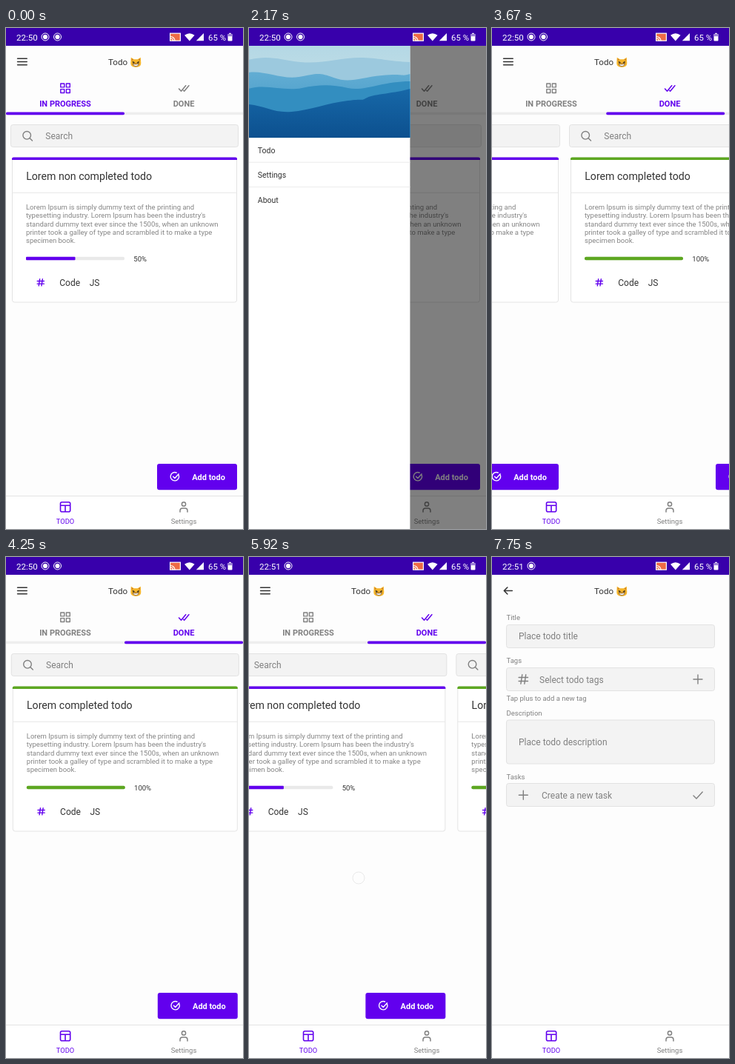
An HTML page that plays this animation: 320 px wide and 676 px high, repeating every 8 s.

```html
<!DOCTYPE html>
<html lang="en">
<head>
<meta charset="utf-8">
<title>Todo app</title>
<style>
html, body { margin: 0; width: 100%; height: 100%; overflow: hidden; background: #fdfdfd; }
svg { display: block; width: 100vw; height: 100vh; font-family: Roboto, sans-serif; }
.line { fill: none; stroke-linecap: round; stroke-linejoin: round; }
</style>
</head>
<body>
<svg id="stage" viewBox="0 0 320 676"></svg>
<script>
const LOOP = 8000;
const PURPLE = '#6200ee', GREEN = '#5da721', GREY = '#808080', INK = '#333';
const stage = document.getElementById('stage');

const text = (x, y, size, fill, str, extra = '') =>
  `<text x="${x}" y="${y}" font-size="${size}" fill="${fill}" ${extra}>${str}</text>`;
const rect = (x, y, w, h, fill, extra = '') =>
  `<rect x="${x}" y="${y}" width="${w}" height="${h}" fill="${fill}" ${extra}/>`;
const line = (d, color = GREY, width = 1.4) =>
  `<path class="line" d="${d}" stroke="${color}" stroke-width="${width}"/>`;
const field = (x, y, w, h) => rect(x + .5, y + .5, w - 1, h - 1, '#f3f3f3', 'rx="3" stroke="#e2e2e2"');
const group = (id, body) => `<g id="${id}">${body}</g>`;

const hash = (x, y, s, color) =>
  line(`M${x - s} ${y - s * .4}h${s * 2}M${x - s} ${y + s * .4}h${s * 2}M${x - s * .25} ${y - s}l${-s * .3} ${s * 2}M${x + s * .55} ${y - s}l${-s * .3} ${s * 2}`, color);
const plus = (x, y) => line(`M${x - 6} ${y}h12M${x} ${y - 6}v12`);

const cat = `<g transform="translate(175.3 46.5)">
  <path d="M-6.5-6.8L-2.5-4.3H2.5L6.5-6.8L7 1Q7 6.2 0 6.4Q-7 6.2-7 1Z" fill="#f5b52a"/>
  <path d="M-5.8-5.2l.4 3 2-1.6zM5.8-5.2l-.4 3-2-1.6z" fill="#c97a2b"/>
  <path d="M-4.7-1.7L-1.4-.3L-1.8 1H-4zM4.7-1.7L1.4-.3L1.8 1H4z" fill="#3d3020"/>
  <path d="M-4.2 2Q0 3.2 4.2 1.6Q3.5 5.2 0 5.2Q-3.5 5-4.2 2Z" fill="#fff" stroke="#6b4318" stroke-width=".7"/>
  <path d="M-1 .9H1L0 2z" fill="#7a4224"/></g>`;
const title = text(138, 50.3, 11.6, INK, 'Todo') + cat;

const record = x => `<circle cx="${x}" cy="12" r="5" fill="none" stroke="#fff"/><circle cx="${x}" cy="12" r="3.1" fill="#fff"/>`;
const statusBar = rect(0, 0, 320, 24, '#3800ab')
  + text(14, 16.5, 11.6, '#fff', '', 'id="clock"') + record(53) + group('second', record(69.5))
  + rect(221.6, 7.2, 13.8, 10, '#ee6b45', 'stroke="#fff" stroke-width="1.2"')
  + line('M222 11.5a6 6 0 0 1 6 6M222 14a3.5 3.5 0 0 1 3.5 3.5', '#fff', 1.1)
  + '<path d="M241 9.8Q247.8 4.8 254.6 9.8L247.8 17.6ZM267 7V17.2H256.8Z" fill="#fff"/>'
  + text(273, 16.5, 11.4, '#fff', '65 %')
  + rect(299.5, 8, 6, 9.5, '#fff', 'rx=".8"') + rect(301.2, 6.8, 2.6, 2, '#fff')
  + rect(299.5, 8, 6, 3.2, '#9b80d5');

const tabs = group('tab0',
    ['73.8 75', '81.4 75', '73.8 82.6', '81.4 82.6'].map(p => `<path class="line" d="M${p}h4.9v4.9h-4.9z" stroke="currentColor" stroke-width="1.4"/>`).join('')
    + text(80, 106, 11, 'currentColor', 'IN PROGRESS', 'font-weight="700" text-anchor="middle"'))
  + group('tab1', line('M233.5 82l3 3.3 6.2-7.6M239.5 84.2l1.2 1.1 6.2-7.6', 'currentColor', 1.5)
    + text(240, 106, 11, 'currentColor', 'DONE', 'font-weight="700" text-anchor="middle"'))
  + rect(0, 113.6, 320, 3.6, '#eeeeee') + rect(0, 113.6, 160, 3.6, PURPLE, 'id="bar" rx="1.6"');

const lorem = ['Lorem Ipsum is simply dummy text of the printing and',
  "typesetting industry. Lorem Ipsum has been the industry's",
  'standard dummy text ever since the 1500s, when an unknown',
  'printer took a galley of type and scrambled it to make a type', 'specimen book.'];

const page = (x, name, color, percent) => `<g transform="translate(${x})">`
  + field(6, 130, 308, 31)
  + '<circle cx="28.2" cy="144.8" r="5.3" fill="none" stroke="#808080" stroke-width="1.4"/>' + line('M32.2 148.8l3.3 3.3')
  + text(53.3, 150.3, 12, GREY, 'Search')
  + rect(8.5, 175, 303, 195, '#fff', 'rx="3" stroke="#e4e4e4"')
  + `<path d="M8 178V176.5Q8 174.5 10 174.5H310Q312 174.5 312 176.5V178Z" fill="${color}"/>`
  + text(27.2, 205.3, 14.15, INK, name) + rect(8.5, 221.7, 303, 1, '#e6e6e6')
  + lorem.map((s, i) => text(27, 245.2 + i * 11.25, 9.5, '#858585', s)).join('')
  + rect(27, 308.7, 133, 4.6, '#e9e9e9', 'rx="2"')
  + rect(27, 308.7, 133 * percent / 100, 4.6, color, percent < 100 ? 'rx="1"' : 'rx="2"')
  + text(172.3, 314.5, 9.5, INK, percent + '%')
  + hash(46.8, 343.3, 4.6, PURPLE) + text(72.3, 348, 12, INK, 'Code') + text(112.7, 348, 12, INK, 'JS')
  + rect(204, 588, 108, 35.3, PURPLE, 'rx="3"')
  + line('M233.2 603.2a5.7 5.7 0 1 1-3-3.2M225.6 605.2l2.3 2.3 5.2-5.8', '#fff', 1.4)
  + text(251.2, 609.8, 11, '#fff', 'Add todo', 'font-weight="700"') + '</g>';

const label = (y, str) => text(19.5, y, 9.5, GREY, str);
const hint = (x, y, str) => text(x, y, 12, GREY, str);
const form = rect(0, 24, 320, 608, '#fdfdfd') + title
  + line('M27.3 45.5H16.3M20.8 41l-4.5 4.5 4.5 4.5', INK, 1.6)
  + label(85, 'Title') + field(19, 91, 282, 32) + hint(36, 111.3, 'Place todo title')
  + label(143, 'Tags') + field(19, 149, 282, 32) + hash(42.3, 165, 6.2, GREY)
  + hint(64, 169.7, 'Select todo tags') + plus(278, 165)
  + label(193.5, 'Tap plus to add a new tag')
  + label(213.8, 'Description') + field(19, 219.5, 282, 60) + hint(36, 254.2, 'Place todo description')
  + label(300, 'Tasks') + field(19, 305, 282, 32) + plus(42.3, 321.3)
  + hint(67, 325.8, 'Create a new task') + line('M272 322l4 4 8.2-9');

const nav = rect(0, 631, 320, 45, '#fff') + rect(0, 631, 320, 1, '#e4e4e4')
  + line('M75.5 639.8h9.2q2 0 2 2v9q0 2-2 2h-9.2q-2 0-2-2v-9q0-2 2-2zM73.5 644.3h13.2M80 644.3v8.5', PURPLE, 1.6)
  + text(80, 669, 9.3, PURPLE, 'TODO', 'text-anchor="middle"')
  + '<circle cx="240" cy="642.4" r="2.6" fill="none" stroke="#808080" stroke-width="1.5"/>'
  + line('M235 653v-1.6q0-3.3 3.3-3.3h3.4q3.3 0 3.3 3.3v1.6', GREY, 1.5)
  + text(240, 669, 9.5, GREY, 'Settings', 'text-anchor="middle"');

const ridge = (d, fill) => `<path d="M0 148V${d}V148Z" fill="${fill}"/>`;
const drawer = rect(0, 24, 218, 652, '#fff') + rect(0, 24, 218, 124.5, 'url(#sky)')
  + ridge('43C28 36 42 43 70 46S125 40 150 40S190 45 218 46', '#9cc9de')
  + ridge('60C22 57 45 70 68 66S94 59 115 67S150 67 180 64S205 66 218 62', 'url(#mid)')
  + ridge('82C24 75 48 86 72 81S112 76 134 81S180 72 218 72', '#338ec0')
  + ridge('103C22 105 34 115 58 113S108 101 134 98S150 99 160 94S198 88 218 82', 'url(#near)')
  + ['Todo', 'Settings', 'About'].map((s, i) => text(12.4, 169 + i * 33.3, 10.5, INK, s)).join('')
  + rect(0, 180.7, 218, 1, '#ececec') + rect(0, 214, 218, 1, '#ececec');

const fade = (id, a, b) => `<linearGradient id="${id}" x2="0" y2="1"><stop stop-color="${a}"/><stop offset="1" stop-color="${b}"/></linearGradient>`;

stage.innerHTML = `<defs>${fade('sky', '#b4d8e5', '#d5e6e8')}${fade('mid', '#62add3', '#3a92c4')}${fade('near', '#1768a8', '#0c508f')}</defs>`
  + rect(0, 0, 320, 676, '#fdfdfd')
  + title + line('M15.6 41.2h12.6M15.6 45.5h12.6M15.6 49.8h12.6', INK, 1.6)
  + tabs
  + group('pages', page(0, 'Lorem non completed todo', PURPLE, 50) + page(320, 'Lorem completed todo', GREEN, 100))
  + group('form', form) + nav
  + rect(0, 24, 320, 652, '#000', 'id="shade"') + group('drawer', drawer)
  + statusBar
  + '<circle id="touch" r="8" fill="#fff" fill-opacity=".55" stroke="#999" stroke-opacity=".35" stroke-width=".8"/>';

const el = {};
stage.querySelectorAll('[id]').forEach(n => el[n.id] = n);

const clamp = v => Math.max(0, Math.min(1, v));
// critically damped spring from 0 to 1
const spring = (t, start, rate) => {
  const k = Math.max(0, t - start) / 1000 * rate;
  return 1 - (1 + k) * Math.exp(-k);
};
const move = (node, x, y = 0) => node.setAttribute('transform', `translate(${x.toFixed(2)} ${y.toFixed(2)})`);

// start, end, x, y, horizontal travel
const touches = [
  [1400, 1680, 15, 46, 0],
  [2600, 3010, 254, 375, 0],
  [3370, 3620, 239, 92, 0],
  [5560, 6020, 60, 433, 88],
  [6980, 7220, 258, 606, 0]
];

function draw(t) {
  const open = spring(t, 1480, 11.8) - spring(t, 2736, 11.8);
  move(el.drawer, 218 * (open - 1));
  el.drawer.style.display = open > .002 ? '' : 'none';
  el.shade.setAttribute('opacity', open * .5);

  const scroll = spring(t, 3430, 10) - spring(t, 5580, 10);
  move(el.pages, -320 * scroll);
  const slide = clamp((t - 3430) / 250) - clamp((t - 5950) / 250);
  move(el.bar, 160 * slide);
  const done = t >= 3430 && t < 5950;
  el.tab0.style.color = done ? GREY : PURPLE;
  el.tab1.style.color = done ? PURPLE : GREY;

  el.clock.textContent = t < 5000 ? '22:50' : '22:51';
  el.second.style.display = t < 5000 ? '' : 'none';

  const enter = 1 - (1 - clamp((t - 7250) / 430)) ** 4;
  el.form.style.display = enter > 0 ? '' : 'none';
  el.form.setAttribute('opacity', enter);
  move(el.form, 0, 48 * (1 - enter));

  const tap = touches.find(([a, b]) => t >= a && t < b);
  el.touch.style.display = tap ? '' : 'none';
  if (tap) {
    const [a, b, x, y, dx] = tap;
    move(el.touch, x + dx * clamp((t - a) / 300), y);
    el.touch.setAttribute('opacity', clamp((b - t) / 130));
  }
}

const begin = performance.now();
function tick() {
  draw((performance.now() - begin) % LOOP);
  requestAnimationFrame(tick);
}
tick();
</script>
</body>
</html>
```
